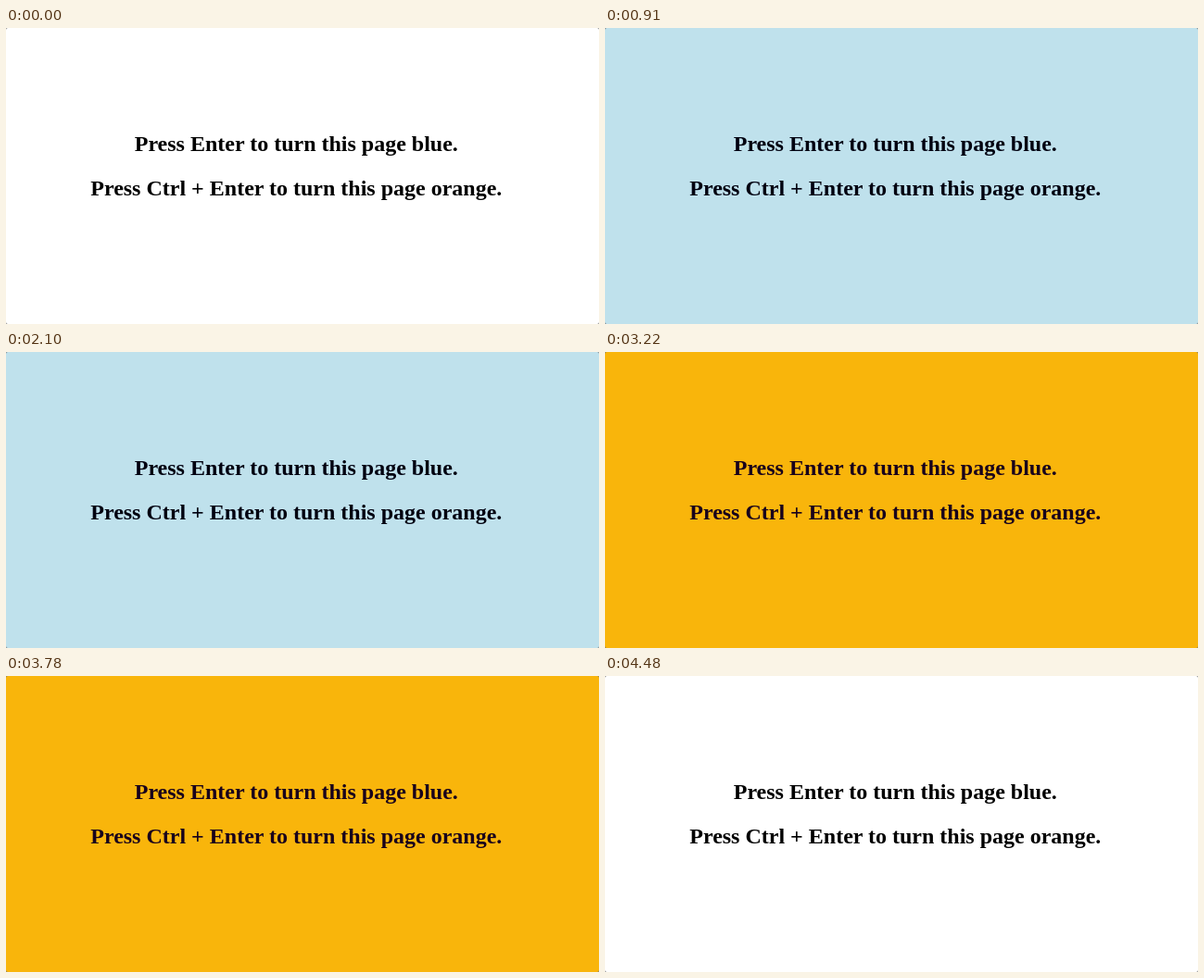
An HTML page that plays this animation: 640 px wide and 320 px high, repeating every 5.18 s.

```html
<!DOCTYPE html>
<html lang="en">
<head>
<meta charset="utf-8">
<title>Page colour keys</title>
<style>
  html, body { margin: 0; width: 100%; height: 100%; overflow: hidden; background: #777; }
  svg { display: block; width: 640px; height: 320px; }
  text { font: bold 24px "Liberation Serif", "Times New Roman", Times, serif; text-anchor: middle; }
  .page { animation: page 5180ms step-end infinite; }
  .words { animation: words 5180ms step-end infinite; }

  /* key presses at 910 and 3220 ms, releases at 2170 and 4480 ms */
  @keyframes page {
    0%, 41.8919%, 86.4865% { fill: #fff; }
    17.5676% { fill: #bfe1ec; }
    62.1622% { fill: #f9b50b; }
  }
  @keyframes words {
    0%, 41.8919%, 86.4865% { fill: #000; }
    17.5676% { fill: #000010; }
    62.1622% { fill: #18001c; }
  }
</style>
</head>
<body>
<svg viewBox="0 0 640 320">
  <rect class="page" width="640" height="320" rx="2"/>
  <g class="words">
    <text x="313.3" y="133">Press Enter to turn this page blue.</text>
    <text x="313.3" y="181">Press Ctrl + Enter to turn this page orange.</text>
  </g>
</svg>
</body>
</html>
```
